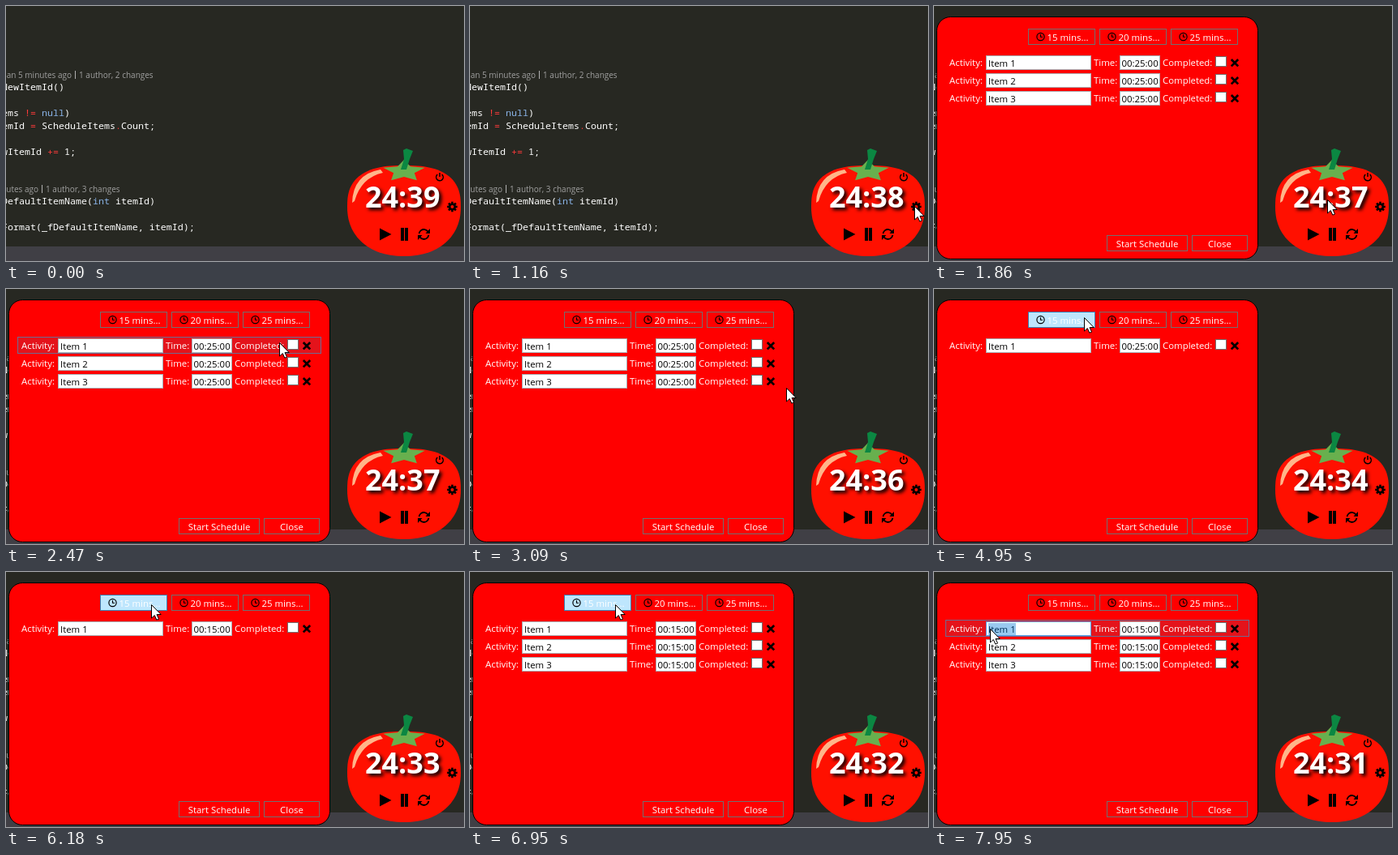
An HTML page with a canvas for the animation above (8000 ms loop, 565x315 px).

```html
<!DOCTYPE html>
<html lang="en">
<head>
<meta charset="utf-8">
<title>Tomato timer</title>
<style>
html, body { margin: 0; width: 100%; height: 100%; overflow: hidden; background: #272822; }
canvas { display: block; width: 565px; height: 315px; }
</style>
</head>
<body>
<canvas id="stage" width="565" height="315"></canvas>
<script>
const ctx = document.getElementById('stage').getContext('2d');
const LOOP = 8000, TAU = Math.PI * 2;
const UI = '"Open Sans", "Noto Sans", sans-serif';
const CODE = '500 11.67px "Noto Sans Mono", "DejaVu Sans Mono", monospace';
const LABEL = '500 11.4px ' + UI;
const WHITE = '#fff', BLACK = '#000', RED = '#f00';

// click times
const removed = [3860, 4570, 5540];
const added = [6180, 6640, 6950];
const passed = (times, t) => times.filter(s => t >= s).length;
const rowCount = t => 3 - passed(removed, t) + passed(added, t);
const rowTop = i => 59 + 22 * i;

const at = (x, y) => ({ x, y });
const cross = i => at(373, rowTop(i) + 11);
const preset = at(182, 38);

// cursor glides: start, end, destination
const entry = at(520, 296);
const glides = [
  [600, 910, at(544, 247)],
  [1080, 1160, at(548, 247)],
  [1630, 1860, at(485, 239)],
  [1860, 2390, at(335, 64)],
  [2390, 3090, at(390, 122)],
  [3090, 3390, cross(2)],
  [3860, 4250, cross(1)],
  [4570, 4950, at(preset.x + 3, preset.y - 3)],
  [5050, 5390, cross(0)],
  [5540, 6030, at(preset.x - 3, preset.y + 2)],
  [7180, 7600, at(104, 70)],
  [7640, 7950, at(69, 70)]
];

function cursorAt(t) {
  if (t < glides[0][0]) return null;
  let { x, y } = entry;
  for (const [from, to, end] of glides) {
    if (t < from) break;
    const u = Math.min(1, (t - from) / (to - from));
    const e = u * u * (3 - 2 * u);
    x += (end.x - x) * e;
    y += (end.y - y) * e;
  }
  return at(Math.round(x), Math.round(y));
}

function text(s, x, y, color, font, align = 'left') {
  ctx.font = font;
  ctx.fillStyle = color;
  ctx.textAlign = align;
  ctx.fillText(s, x, y);
}
const label = (s, x, y, color = WHITE, align) => text(s, x, y, color, LABEL, align);

function rect(x, y, w, h, fill) {
  ctx.fillStyle = fill;
  ctx.fillRect(x, y, w, h);
}

function box(x, y, w, h, fill, stroke) {
  rect(x, y, w, h, stroke);
  rect(x + 1, y + 1, w - 2, h - 2, fill);
}

function trace(points) {
  ctx.beginPath();
  points.forEach(p => ctx.lineTo(p[0], p[1]));
}

function poly(points, fill) {
  trace(points);
  ctx.closePath();
  ctx.fillStyle = fill;
  ctx.fill();
}

function stroke(width, color = BLACK) {
  ctx.lineWidth = width;
  ctx.strokeStyle = color;
  ctx.stroke();
}

function line(width, ...points) {
  trace(points);
  stroke(width);
}

function arc(x, y, r, from, to, width) {
  ctx.beginPath();
  ctx.arc(x, y, r, from, to);
  stroke(width);
}

// points around a centre, i from 0 to n - 1
const ring = (n, fn) => Array.from({ length: n }, (_, i) => fn(i / n * TAU, i));

function code(y, s) {
  let x = -5;
  for (const part of s.split(/(!=|\+=|=|\.|\bnull\b|\bint\b)/)) {
    const color = /^[!+=.]/.test(part) ? '#ff3a3a' : /^(null|int)$/.test(part) ? '#8ab4e8' : WHITE;
    text(part, x, y, color, CODE);
    x += 7 * part.length;
  }
}

function lens(y, age, end, changes) {
  const font = '10px ' + UI;
  text(age, end, y, '#a0a0a0', font, 'right');
  rect(end + 4, y - 9, 1, 10, '#b0b0b0');
  text(changes, end + 9, y, '#a0a0a0', font);
}

function editor(t) {
  rect(0, 0, 565, 315, '#272822');
  rect(0, 297, 565, 18, '#403f45');
  lens(89, 'Less than 5 minutes ago', 81, '1 author, 2 changes');
  code(104, 'NewItemId()');
  code(136, 'ems != null)');
  code(152, 'emId = ScheduleItems.Count;');
  code(184, 'wItemId += 1;');
  lens(230, '15 minutes ago', 40, '1 author, 3 changes');
  code(245, 'DefaultItemName(int itemId)');
  code(277, 'Format(_fDefaultItemName, itemId);');
  if (t >= 530 && t < 1080) rect(184, 139, 1, 16, '#f8f8f0');
}

function gear(x, y) {
  ring(8, a => line(2.6, [x, y], [x + 6.3 * Math.cos(a), y + 6.3 * Math.sin(a)]));
  ctx.beginPath();
  ctx.arc(x, y, 4.6, 0, TAU);
  ctx.fillStyle = BLACK;
  ctx.fill();
  ctx.beginPath();
  ctx.arc(x, y, 2, 0, TAU);
  ctx.fillStyle = '#ff1000';
  ctx.fill();
}

function refresh(x, y) {
  for (const s of [1, -1]) {
    const turn = s > 0 ? 0 : Math.PI;
    arc(x, y, 6, turn + 3.3, turn + 5.7, 1.8);
    poly([[x + 7.5 * s, y - 7 * s], [x + 7.5 * s, y - s], [x + 2 * s, y - s]], BLACK);
  }
}

// squarer above the waist, rounder below
function body() {
  return ring(120, a => {
    const c = Math.cos(a), s = Math.sin(a);
    const [ry, n] = s < 0 ? [51, 2.6] : [61, 2.2];
    const bend = v => Math.sign(v) * Math.abs(v) ** (2 / n);
    return [491 + 70 * bend(c), 248 + ry * bend(s)];
  });
}

function leaf() {
  return ring(10, (a, i) => {
    const r = i % 2 ? 0.5 : 1;
    return [491 + 27 * r * Math.sin(a), 204 - 14 * r * Math.cos(a)];
  });
}

function tomato(t) {
  poly(body(), '#ff1000');

  ctx.beginPath();
  ctx.moveTo(427, 243);
  ctx.quadraticCurveTo(428, 208, 462, 202);
  ctx.lineTo(465, 206);
  ctx.quadraticCurveTo(438, 212, 430, 241);
  ctx.fillStyle = '#ffb589';
  ctx.fill();

  poly(leaf(), '#68b04e');
  poly([[487, 202], [491, 189], [490, 178], [494, 176], [502, 179], [498, 189], [494, 202]], '#0b8742');

  ctx.save();
  ctx.shadowColor = BLACK;
  ctx.shadowBlur = 4;
  ctx.shadowOffsetX = ctx.shadowOffsetY = 3;
  const left = 39 - Math.floor((t + 360) / 1000);
  text('24:' + left, 443, 249, WHITE, 'bold 36px ' + UI);
  ctx.restore();

  poly([[461, 274.5], [475.5, 282], [461, 289.5]], BLACK);
  for (const x of [487, 492]) rect(x, 274, 4, 16, BLACK);
  refresh(515.5, 282);
  arc(535, 211.5, 4.3, -0.9, Math.PI + 0.9, 1.5);
  line(1.5, [535, 206], [535, 211]);
  gear(550.5, 248);
}

const inside = (c, x, y, w, h) => c && c.x >= x && c.x < x + w && c.y >= y && c.y < y + h;

function timeButton(i, c, t) {
  const x = 116 + 88 * i;
  const hot = inside(c, x, 28, 83, 20);
  const pressed = hot && added.some(s => t >= s - 80 && t < s);
  box(x, 28, 83, 20, pressed ? '#c4e5f6' : hot ? '#bee6fd' : RED, hot ? '#3c7fb1' : '#707070');
  arc(x + 15.5, 38, 4.6, 0, TAU, 1.2);
  line(1.1, [x + 15.5, 35], [x + 15.5, 38.3], [x + 18, 38.3]);
  label(15 + 5 * i + ' mins...', x + 23.5, 43);
}

function button(x, w, s) {
  box(x, 283, w, 20, RED, '#707070');
  label(s, x + w / 2, 298, WHITE, 'center');
}

function row(i, c, t) {
  const y = rowTop(i);
  const editing = i === 0 && t >= 7640;
  if (inside(c, 14, y, 375, 22)) box(14, y, 375, 21, '#e4131b', '#706a90');
  label('Activity:', 19, y + 15);
  box(64, y + 2, 130, 18, WHITE, editing ? '#569de5' : '#abadb3');
  label('Item ' + (i + 1), 67, y + 16, BLACK);
  if (editing) {
    const from = Math.max(67, Math.min(101, c.x - 2));
    rect(from, y + 4, 101 - from, 15, 'rgba(0,120,215,.4)');
  }
  label('Time:', 197, y + 15);
  box(229, y + 2, 50, 18, WHITE, '#abadb3');
  label(t < added[0] - 200 ? '00:25:00' : '00:15:00', 231.5, y + 16, BLACK);
  label('Completed:', 282, y + 15);
  box(347, y + 3, 14, 13, WHITE, '#707070');
  for (const s of [-4.2, 4.2]) line(2.7, [371 - s, y + 7], [371 + s, y + 15.4]);
}

function panel(t, c) {
  if (t < 1310) return;
  ctx.save();
  ctx.globalAlpha = t < 1380 ? 0.5 : 1;
  ctx.beginPath();
  ctx.roundRect(3.5, 13.5, 396, 299, 17);
  ctx.fillStyle = RED;
  ctx.fill();
  stroke(1);
  for (let i = 0; i < 3; i++) timeButton(i, c, t);
  for (let i = 0; i < rowCount(t); i++) row(i, c, t);
  button(213, 100, 'Start Schedule');
  button(318, 69, 'Close');
  ctx.restore();
}

function arrow({ x, y }) {
  const shape = [[0, 0], [0, 16.5], [3.8, 13], [6.3, 18.7], [9, 17.5], [6.5, 12], [11.7, 12]];
  poly(shape.map(([dx, dy]) => [x + 0.5 + dx, y + 0.5 + dy]), WHITE);
  stroke(1);
}

function draw(t) {
  const c = cursorAt(t);
  editor(t);
  panel(t, c);
  tomato(t);
  if (c) arrow(c);
}

let start = null;
function tick(now) {
  if (start === null) start = now;
  draw((now - start) % LOOP);
  requestAnimationFrame(tick);
}
draw(0);
requestAnimationFrame(tick);
</script>
</body>
</html>
```
